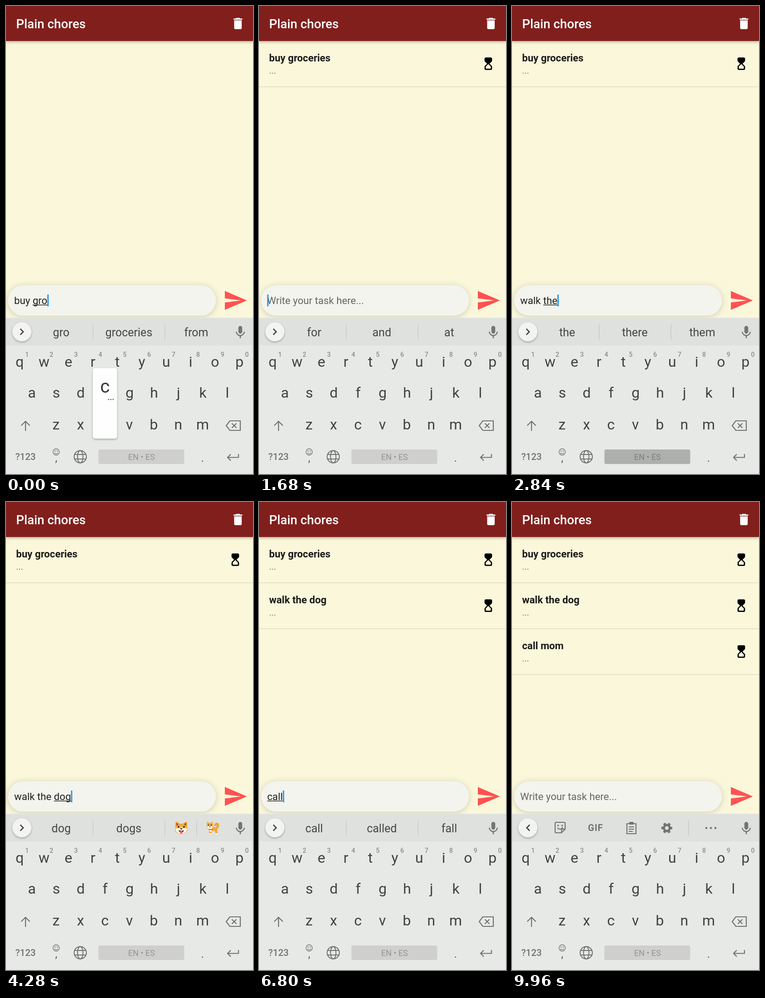
An HTML page that plays this animation: 544 px wide and 1030 px high, repeating every 10000 ms.

```html
<!DOCTYPE html>
<html lang="en">
<head>
<meta charset="utf-8">
<title>Task list</title>
<style>
  html, body { margin: 0; width: 100%; height: 100%; overflow: hidden; background: #faf7db; }
  svg { display: block; width: 544px; height: 1030px; font-family: Roboto, sans-serif; }
  text { white-space: pre; }
  .mid { text-anchor: middle; }
  .line { fill: none; stroke: #707270; stroke-width: 2.2; }
  .bar { filter: drop-shadow(0 2px 3px rgba(0,0,0,.32)); }
  .pill { filter: drop-shadow(0 2px 7px rgba(70,70,40,.24)); }
  .lift { filter: drop-shadow(0 2px 2px rgba(0,0,0,.28)); }
</style>
</head>
<body>
<svg id="stage" viewBox="0 0 544 1030"></svg>
<script>
const LOOP = 10000, RELEASE = 80, POPUP = 110, TOOLBAR_DELAY = 480;
const KEY_STEP = 53.8;

// Each entry is a press time and a key; "_" is space, ">" is send.
const presses = `-20c 150e 290r 440i 580e 740s 1260> 1740w 1920a 2080l 2220k 2340_ 2460t 2570h 2670e 2800_
  3200d 3450o 3740g 4520> 6260c 6400a 6520l 6640l 6960_ 7360m 7620o 8060m 9340>`
  .split(/\s+/).map(entry => ({ at: parseInt(entry), key: entry.slice(-1).replace('_', ' ') }));

const suggestions = {
  '': 'for and at',
  'buy gro': 'gro groceries from', 'buy groc': 'groc groceries grocery', 'buy groce': 'groce groceries grocery',
  'buy grocer': 'grocer groceries grocery', 'buy groceri': 'groceri *groceries grocery',
  'buy grocerie': 'grocerie *groceries grocery', 'buy groceries': 'groceries grocery grocers',
  w: 'w with we', wa: 'wa was want', wal: 'wal walk wall', walk: 'walk walking walked',
  'walk ': 'in to the', 'walk t': 't to the', 'walk th': 'th the that', 'walk the': 'the there them',
  'walk the ': 'same first best', 'walk the d': 'd day dog', 'walk the do': 'do dog door', 'walk the dog': 'dog dogs',
  c: 'c can could', ca: 'ca can call', cal: 'cal call called', call: 'call called fall',
  'call ': 'me you the', 'call m': 'm me my', 'call mo': 'mo *no more', 'call mom': "mom mom's moment"
};

const rows = [
  { keys: 'qwertyuiop', x: 30, y: 794 },
  { keys: 'asdfghjkl', x: 57, y: 862 },
  { keys: 'zxcvbnm', x: 110.3, y: 932 }
];

const text = (x, y, size, fill, content, extra = '') =>
  `<text x="${x}" y="${y}" font-size="${size}" fill="${fill}" ${extra}>${content}</text>`;
const mid = (x, y, size, fill, content, extra = '') => text(x, y, size, fill, content, 'class="mid" ' + extra);
const rect = (x, y, w, h, fill, extra = '') =>
  `<rect x="${x}" y="${y}" width="${w}" height="${h}" fill="${fill}" ${extra}/>`;
const icon = (x, y, scale, fill, d) =>
  `<path transform="translate(${x} ${y}) scale(${scale})" fill="${fill}" d="${d}"/>`;
const line = (d, extra = '') => `<path class="line" d="${d}" ${extra}/>`;
const separator = x => rect(x - .7, 701, 1.4, 33, '#c5c7c5');

const hourglass = 'M8 2c-1.1 0-2 .9-2 2v3.2c0 .5.2 1 .6 1.4L10 12l-3.4 3.4c-.4.4-.6.9-.6 1.4V20c0 1.1.9 2 2 2h8c1.1 0 2-.9 2-2v-3.2c0-.5-.2-1-.6-1.4L14 12l3.4-3.4c.4-.4.6-.9.6-1.4V4c0-1.1-.9-2-2-2zM16 16.5V19c0 .6-.4 1-1 1H9c-.6 0-1-.4-1-1v-2.5l4-4z';
const trash = 'M6 19c0 1.1.9 2 2 2h8c1.1 0 2-.9 2-2V7H6zM19 4h-3.5l-1-1h-5l-1 1H5v2h14z';
const plane = 'M2 21L23 12 2 3v7l15 2-15 2z';
const mic = 'M12 14a3 3 0 0 0 3-3V5a3 3 0 0 0-6 0v6a3 3 0 0 0 3 3zm5.3-3c0 3-2.5 5.1-5.3 5.1S6.7 14 6.7 11H5c0 3.4 2.7 6.2 6 6.7V21h2v-3.3c3.3-.5 6-3.3 6-6.7z';

const dogFace = `<g transform="translate(386 717)">
  <path fill="#f5a83b" d="M-12-14Q-6-12-4-9H4Q6-12 12-14Q14-6 13-1L14 6Q9 14 0 14T-14 6L-13-1Q-14-6-12-14z"/>
  <path fill="#8a4b3a" d="M-11-11L-6-8-10-4zM11-11L6-8 10-4z"/>
  <path fill="#fff6e5" d="M-13 2Q-7-1-3 1L0-3 3 1Q7-1 13 2L12 7Q8 13 0 13T-12 7z"/>
  <circle cx="-6" cy="-2" r="1.9" fill="#3b2925"/><circle cx="6" cy="-2" r="1.9" fill="#3b2925"/>
  <path fill="#3b2925" d="M-3 1H3L0 4.500zM-6 5Q0 8 6 5Q4 11 0 11T-6 5z"/>
  <path fill="#f3586c" d="M-3 8Q0 6 3 8Q3 13 0 13T-3 8z"/></g>`;

const dogBody = `<g transform="translate(455 717)">
  <path fill="none" stroke="#f0a036" stroke-width="5" stroke-linecap="round" d="M8 1Q14-3 11-8Q8-10 6-6"/>
  <path fill="#f5a83b" d="M-12-14L-8-11H-4L0-14 1-5Q1-2 3-1H10Q12 2 10 7L12 14H7L5 7H-2L-3 14H-8L-8 4Q-13 2-13-5z"/>
  <path fill="#fff4df" d="M-12-3Q-6-5 0-3L-1 2Q-4 5-7 3-12 2-12-3zM-7 4L-2 5-3 9-7 8zM-8 12H-3V14H-9zM7 12H12V14H7z"/>
  <circle cx="-9" cy="-6" r="1.300" fill="#3b2925"/><circle cx="-3" cy="-6" r="1.300" fill="#3b2925"/>
  <path fill="#3b2925" d="M-8-3H-4L-6-1z"/><path stroke="#e0513f" stroke-width="2" d="M-8 3Q-4 5 0 3" fill="none"/></g>`;

const toolbar = line('M95 707Q95 705 97 705H115Q117 705 117 707V720L109 728H97Q95 728 95 726zM117 720H111Q109 720 109 728M100 717Q106 724 112 716') +
  '<g fill="#707270"><circle cx="101.500" cy="712" r="1.800"/><circle cx="110.500" cy="712" r="1.800"/></g>' +
  mid(184, 723.5, 20, '#707270', 'GIF', 'font-weight="700" letter-spacing="1"') +
  line('M253 708H273V730H253zM257 715H269M257 720H269M257 725H266') +
  rect(258, 704, 10, 6, '#707270', 'rx="2"') +
  '<g fill="none" stroke="#707270"><circle cx="341" cy="717.500" r="6.500" stroke-width="5"/>' +
  '<circle cx="341" cy="717.500" r="10" stroke-width="4" stroke-dasharray="5.500 4.972" stroke-dashoffset="2.750"/></g>' +
  separator(389) +
  [428, 438, 448].map(x => `<circle cx="${x}" cy="717.500" r="2.300" fill="#707270"/>`).join('');

function keyboard() {
  const letters = rows.map((row, r) => [...row.keys].map((key, i) => {
    const x = row.x + i * KEY_STEP;
    const digit = r ? '' : mid(x + 16.3, 771.5, 14, '#8b8d8b', (i + 1) % 10, 'font-weight="500"');
    return mid(x, row.y, 32, '#414340', key) + digit;
  }).join('')).join('');
  return letters +
    line('M43 935V915M33.500 923.500L43 914L52.500 923.500') +
    line('M493 913H516V934H493L485 923.500zM497.500 918.500L507.500 928.500M507.500 918.500L497.500 928.500') +
    mid(43, 999, 20.5, '#707270', '?123', 'font-weight="500"') +
    '<g class="line" style="stroke-width:1.400"><circle cx="110.500" cy="981.500" r="7"/><path d="M106.500 983.500Q110.500 988 114.500 983.500"/></g>' +
    '<g fill="#707270"><circle cx="108" cy="979.500" r="1.200"/><circle cx="113" cy="979.500" r="1.200"/></g>' +
    mid(110.5, 1003, 24, '#555755', ',') +
    '<g class="line" style="stroke-width:2"><circle cx="163.500" cy="992" r="13.500"/><ellipse cx="163.500" cy="992" rx="6" ry="13.500"/><path d="M151 987H176M151 997H176"/></g>' +
    mid(433, 1003, 24, '#555755', '.') +
    line('M512 986V993.500H488M495 986.500L488 993.500L495 1000.500');
}

document.getElementById('stage').innerHTML =
  rect(0, 0, 544, 1030, '#faf7db') + '<g id="items"></g>' +
  rect(0, -10, 544, 87, '#811f1c', 'class="bar"') +
  text(22.2, 48.5, 27.7, '#fff', 'Plain chores', 'font-weight="500"') +
  icon(494.2, 21.9, 1.385, '#fff', trash) +
  rect(4.5, 614.5, 458, 67, '#f3f4ed', 'rx="33.5" class="pill"') +
  icon(477.4, 620.3, 2.308, '#ff5250', plane) + '<g id="input"></g>' +
  rect(0, 686.5, 544, 344, '#e7e9e6') + rect(0, 686.5, 544, 60.5, '#dfe1df') +
  '<circle cx="35" cy="717" r="21" fill="#f3f4f1" class="lift"/>' +
  icon(499, 701.2, 1.42, '#737573', mic) + '<g id="strip"></g>' +
  keyboard() + '<g id="space"></g><g id="popup"></g>';

const ruler = document.createElement('canvas').getContext('2d');
function measure(content) {
  ruler.font = '22.16px Roboto, sans-serif';
  return ruler.measureText(content).width;
}

function stateAt(time) {
  const state = { text: 'buy gro', items: [], changed: -100, pressed: null };
  for (const { at, key } of presses) {
    if (time >= at && time < at + POPUP) state.pressed = key;
    if (time < at + RELEASE) break;
    state.changed = at + RELEASE;
    if (key === '>') {
      state.items.push(state.text);
      state.text = '';
    } else state.text += key;
  }
  state.idle = time - state.changed;
  return state;
}

function drawItem(title, i) {
  const y = 101.1 * i;
  return text(22.2, 121.5 + y, 22.16, '#1c1b18', title, 'font-weight="700"') +
    text(22.2, 149 + y, 19.4, '#77756a', '...') +
    icon(488.4, 110.4 + y, 1.385, '#000', hourglass) +
    rect(0, 177 + y, 544, 1.4, '#dcdac4');
}

function drawInput({ text: typed, idle }) {
  const x = 18, end = x + measure(typed);
  const wordStart = x + measure(typed.slice(0, typed.lastIndexOf(' ') + 1));
  return (typed ? text(x, 656, 22.16, '#1f1f1d', typed) : text(x, 656, 22.16, '#666762', 'Write your task here...')) +
    (end > wordStart ? rect(wordStart, 657.3, end - wordStart, 1.5, '#2b2b29') : '') +
    (idle % 1000 < 500 ? rect(end, 635, 3, 26, '#2c98ea') : '');
}

function drawStrip({ text: typed, idle }) {
  const open = !typed && idle >= TOOLBAR_DELAY;
  const chevron = line(open ? 'M39 710.500L32.500 717L39 723.500' : 'M31.500 710.500L38 717L31.500 723.500',
    'style="stroke:#3f413f;stroke-width:2.500"');
  if (open) return chevron + toolbar;
  const words = suggestions[typed].split(' ').map((word, i) =>
    mid([121.5, 270.5, 419][i], 727, 25, '#454745', word.replace('*', ''), word[0] === '*' ? 'font-weight="700"' : ''));
  const pets = typed === 'walk the dog' ? separator(420) + dogFace + dogBody : '';
  return chevron + separator(192) + separator(350) + words.join('') + pets;
}

function drawPopup(key) {
  const r = rows.findIndex(row => key && row.keys.includes(key));
  if (r < 0) return '';
  const x = rows[r].x + rows[r].keys.indexOf(key) * KEY_STEP, y = 657 + 70 * r;
  const dots = r === 0 || 'asclnz'.includes(key)
    ? [8, 13, 18].map(dx => `<circle cx="${x + dx}" cy="${y + 69}" r="1.300" fill="#414340"/>`).join('') : '';
  return rect(x - 26.7, y, 53.4, 155, '#fdfefd', 'rx="5" class="lift"') +
    mid(x, y + 54, 40, '#363836', key) + dots;
}

const drawSpace = key => rect(203.5, 976, 189, 32, key === ' ' ? '#aeb0ae' : '#cfd0ce', 'rx="4"') +
  mid(298.5, 998.5, 18, key === ' ' ? '#7d7f7d' : '#929492', 'EN • ES');

const shown = {};
function put(id, markup) {
  if (shown[id] !== markup) document.getElementById(id).innerHTML = shown[id] = markup;
}

function render(time) {
  const state = stateAt(time);
  put('items', state.items.map(drawItem).join(''));
  put('input', drawInput(state));
  put('strip', drawStrip(state));
  put('space', drawSpace(state.pressed));
  put('popup', drawPopup(state.pressed));
}

const start = performance.now();
function tick() {
  render((performance.now() - start) % LOOP);
  requestAnimationFrame(tick);
}
tick();
</script>
</body>
</html>
```
